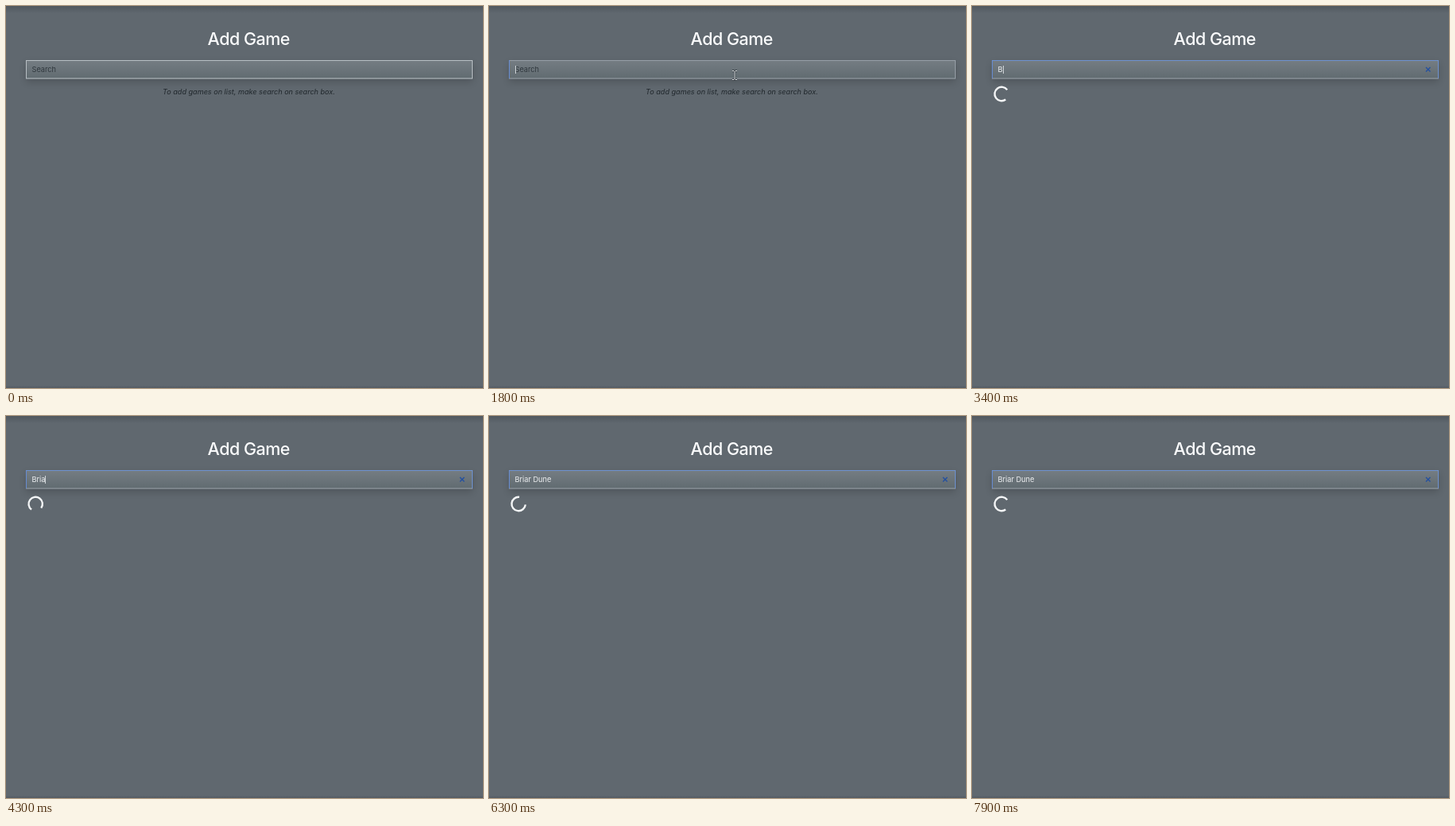
Recreate the animation shown at these times as an HTML page with a canvas. Size 600 px wide and 480 px high, loop 8 s.

```html
<!DOCTYPE html>
<html lang="en">
<head>
<meta charset="utf-8">
<title>Add Game</title>
<style>
  html, body { margin: 0; width: 100%; height: 100%; overflow: hidden; background: #60686f; }
  canvas { display: block; }
</style>
</head>
<body>
<canvas id="stage" width="600" height="480"></canvas>
<script>
const ctx = document.getElementById('stage').getContext('2d');
const LOOP = 8000, STEP = 100;
const MOVE = 1100, FOCUS = 1800;
const QUERY = 'Briar Dune';
const KEYS = [3400, 3800, 4100, 4300, 4500, 4700, 4900, 5100, 5300, 5400];
const BOX = { x: 25, y: 68, w: 562, h: 23.5 };

const clamp = v => Math.max(0, Math.min(1, v));

function gradient(y0, y1, ...colors) {
  const g = ctx.createLinearGradient(0, y0, 0, y1);
  colors.forEach((c, i) => g.addColorStop(i / (colors.length - 1), c));
  return g;
}

function text(str, x, y, font, color, align = 'left', spacing = 0) {
  ctx.font = font + ' Inter, sans-serif';
  ctx.letterSpacing = spacing + 'px';
  ctx.textAlign = align;
  ctx.fillStyle = color;
  ctx.fillText(str, x, y);
}

function line(points, color, width) {
  ctx.beginPath();
  points.forEach(([x, y]) => ctx.lineTo(x, y));
  ctx.strokeStyle = color;
  ctx.lineWidth = width;
  ctx.stroke();
}

function drawPage() {
  ctx.fillStyle = '#60686f';
  ctx.fillRect(0, 0, 600, 480);
  ctx.fillStyle = gradient(0, 9, 'rgba(60,68,77,.45)', 'rgba(60,68,77,0)');
  ctx.fillRect(0, 0, 600, 9);
  ctx.fillStyle = gradient(477, 480, 'rgba(60,68,77,0)', 'rgba(60,68,77,.4)');
  ctx.fillRect(0, 477, 600, 3);
  text('Add Game', 305.3, 48.5, '500 21.5px', '#fafbfc', 'center', -0.5);
}

function drawBox(t) {
  const { x, y, w, h } = BOX, r = x + w - 0.5, b = y + h - 0.5;
  ctx.save();
  ctx.shadowColor = 'rgba(0,0,0,.18)';
  ctx.shadowBlur = 10;
  ctx.shadowOffsetY = 4;
  ctx.fillStyle = '#687177';
  ctx.fillRect(x, y, w, h);
  ctx.restore();
  ctx.fillStyle = gradient(y, y + h, '#757d83', '#6b747a', '#606b70');
  ctx.fillRect(x, y, w, h);
  ctx.strokeStyle = t < FOCUS ? '#b8bfc4' : '#979fa7';
  ctx.lineWidth = 1;
  ctx.strokeRect(x + 0.5, y + 0.5, w - 1, h - 1);
  if (t < FOCUS) return;
  line([[x + 0.5, y], [x + 0.5, b]], '#668cd2', 1);
  ctx.globalAlpha = clamp((t - FOCUS) / 200);
  line([[x, y + 0.5], [r, y + 0.5], [r, b]], '#6e92d0', 1);
  ctx.globalAlpha = 1;
}

function drawField(t) {
  const typed = QUERY.slice(0, KEYS.filter(k => k <= t).length);
  if (typed) {
    text(typed, 32.5, 83.3, '9.2px', '#eef0f2');
    line([[571, 77], [576.5, 82.5]], '#2450a0', 1.4);
    line([[576.5, 77], [571, 82.5]], '#2450a0', 1.4);
  } else {
    text('Search', 32.5, 83.3, '9.2px', '#30383e');
  }
  // The blink restarts with every key press
  const since = t - [FOCUS, ...KEYS].filter(k => k <= t).pop();
  if (since % 1000 < 500) {
    const x = Math.round(32.5 + ctx.measureText(typed).width) + 0.5;
    line([[x, 75], [x, 85]], '#d0d5d9', 1);
  }
}

function drawSpinner(t) {
  const a = (t - KEYS[0]) / 750 * 2 * Math.PI + 0.16;
  ctx.beginPath();
  ctx.arc(37.2, 110.5, 8.7, a + Math.PI / 4, a + Math.PI * 7 / 4);
  ctx.strokeStyle = '#f3f5f6';
  ctx.lineWidth = 2.4;
  ctx.stroke();
}

function drawCursor(t) {
  const rest = (1 - clamp((t - MOVE) / 500)) ** 2;
  ctx.save();
  ctx.translate(309 + 99 * rest, 87 + 195 * rest);
  if (rest < 0.15) {
    for (const [color, width] of [['#353c42', 2.4], ['#dfe3e6', 1]]) {
      line([[-3, -5.5], [-1, -5.5], [0, -4.5], [1, -5.5], [3, -5.5]], color, width);
      line([[0, -4.5], [0, 4.5]], color, width);
      line([[-3, 5.5], [-1, 5.5], [0, 4.5], [1, 5.5], [3, 5.5]], color, width);
    }
  } else {
    line([[0, 0], [0, 12], [2.8, 9.5], [4.8, 14], [6.8, 13], [4.9, 8.8], [8.5, 8.6], [0, 0]], '#fff', 1.4);
    ctx.fillStyle = '#111';
    ctx.fill();
  }
  ctx.restore();
}

function frame(now) {
  const t = Math.floor(now % LOOP / STEP) * STEP;
  drawPage();
  drawBox(t);
  drawField(t);
  if (t < KEYS[0]) {
    text('To add games on list, make search on search box.', 305.5, 111.4, 'italic 9.1px', '#20272c', 'center');
    if (t >= MOVE) drawCursor(t);
  } else {
    drawSpinner(t);
  }
  requestAnimationFrame(frame);
}
requestAnimationFrame(frame);
</script>
</body>
</html>
```
